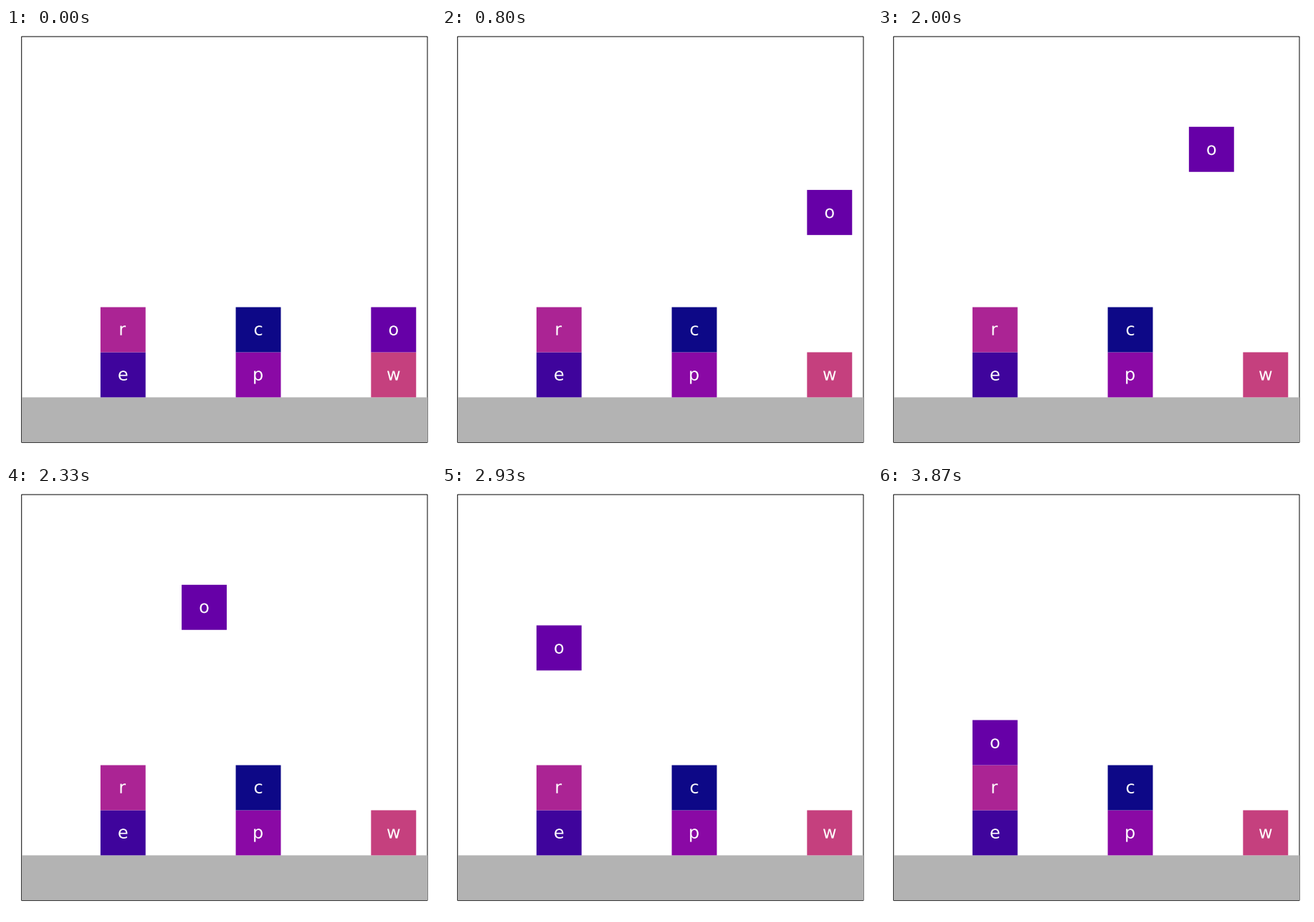
Write a matplotlib script that moves like this. It is 600x600 px and loops after 3940 ms.

```python
import matplotlib.pyplot as plt
from matplotlib.animation import FuncAnimation
from matplotlib.patches import PathPatch, Rectangle
from matplotlib.textpath import TextPath
from matplotlib.transforms import Affine2D

SIZE, DPI = 600, 100
LOOP_MS, TICK_MS = 3940, 20
LEFT, RIGHT = 21.72, 588      # axes span in pixels, same on both sides
UNIT = (RIGHT - LEFT) / 9     # one block in pixels
EM = 24 / UNIT                # letter size in blocks
BASELINE = 0.5 - 7.7 / UNIT
COLUMNS = (1.75, 4.75, 7.75)
STACKS = ("er", "pc", "wo")   # bottom to top
SHADES = "ceoprw"
LIFT, SHIFT, DROP = 0.2, 0.6, 0.15   # blocks per step

plt.rcParams["font.family"] = "DejaVu Sans"
cmap = plt.get_cmap("plasma")

fig = plt.figure(figsize=(SIZE / DPI, SIZE / DPI), dpi=DPI, facecolor="white")
span = (RIGHT - LEFT) / SIZE
ax = fig.add_axes([LEFT / SIZE, LEFT / SIZE, span, span])
ax.set(xlim=(0, 9), ylim=(0, 9))
ax.axis("off")


def letter_path(name):
    """Outline of a letter, its ink centred across a unit block."""
    path = TextPath((0, 0), name, size=EM)
    ink = path.get_extents()
    shift = Affine2D().translate(0.5 - (ink.x0 + ink.x1) / 2, BASELINE)
    return shift.transform_path(path)


def add_block(name):
    box = Rectangle((0, 0), 1, 1, facecolor=cmap(0.095 * SHADES.index(name)),
                    linewidth=0, snap=False)
    letter = PathPatch(letter_path(name), facecolor="white",
                       linewidth=0, snap=False)
    return ax.add_patch(box), ax.add_patch(letter)


def place(parts, x, y):
    for part in parts:
        part.set_transform(Affine2D().translate(x, y) + ax.transData)


# the ground covers the inner half of the border line
ax.add_patch(Rectangle((0, 0), 9, 9, fill=False, edgecolor="black",
                       linewidth=0.72, snap=False, clip_on=False))
ax.add_patch(Rectangle((0, 0), 9, 1, facecolor="0.7", linewidth=0, snap=False))

blocks = {}
for x, names in zip(COLUMNS, STACKS):
    for level, name in enumerate(names, start=1):
        blocks[name] = add_block(name)
        place(blocks[name], x, level)


def clamp(steps, most):
    return max(0, min(steps, most))


def block_position(step):
    # lift and shift both begin with a double step
    up = clamp(step + 1, 20) if step > 0 else 0
    across = clamp(step - 28, 10) if step >= 30 else 0
    down = clamp(step - 38, 20)
    return COLUMNS[2] - SHIFT * across, 2 + LIFT * up - DROP * down


def draw(tick):
    ms = tick * TICK_MS + TICK_MS // 2
    step = (ms + 4) * 15 // 1000      # 15 steps a second, on a 10 ms grid
    place(blocks["o"], *block_position(step))
    return blocks["o"]


anim = FuncAnimation(fig, draw, frames=LOOP_MS // TICK_MS, interval=TICK_MS,
                     repeat=True, repeat_delay=0, blit=False)
plt.show()
```
